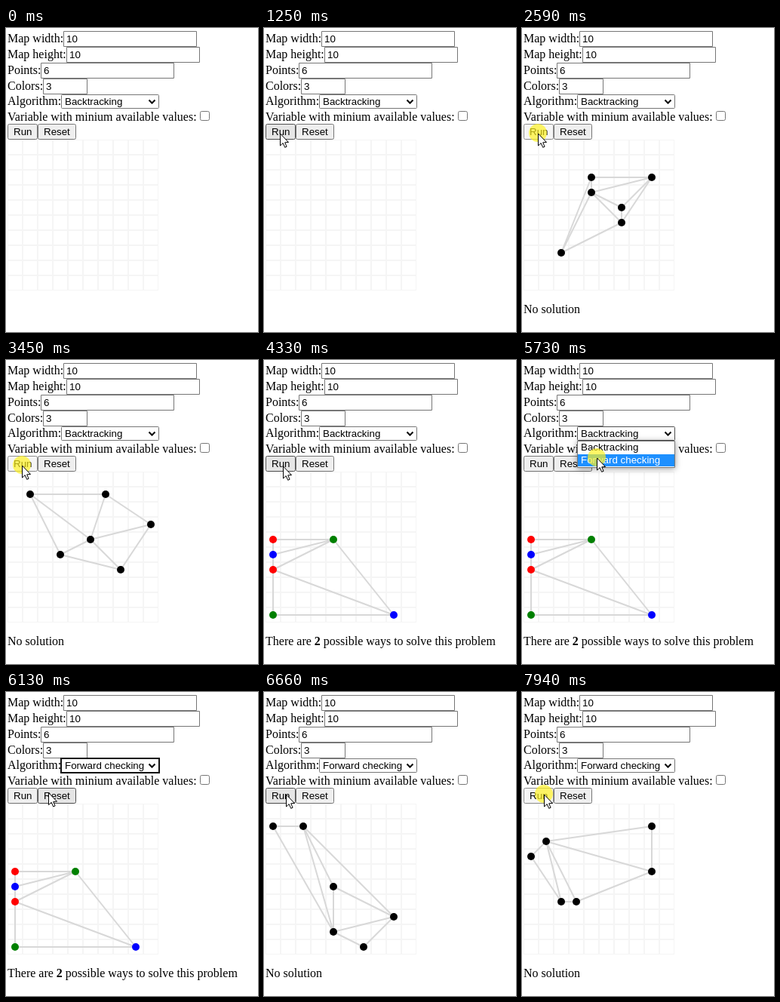
These frames come from a looping animation (334 by 403 pixels, 8 s). An HTML page with a canvas:

```html
<!DOCTYPE html>
<html lang="en">
<head>
<meta charset="utf-8">
<title>Map colouring</title>
<style>
html, body { margin: 0; width: 100%; height: 100%; overflow: hidden; background: #fff; }
canvas { display: block; }
</style>
</head>
<body>
<canvas id="stage" width="334" height="403"></canvas>
<script>
const ctx = document.getElementById('stage').getContext('2d');
const LOOP = 8000;
const HOLD = 130;                      // how long a click lasts
const APPEAR = 120, OPEN = 4860, PICK = 5730, RERUN = 6530;
const LEFT = 2, CELL = 20, GRID_TOP = 148;
const SERIF = '16px "Liberation Serif", serif';
const SANS = '13.333px "Liberation Sans", sans-serif';
const COLORS = ['red', 'green', 'blue'];
const EDGE = '#767676', HOT_EDGE = '#4f4f4f';

// Each run places six points, written as column and row digits.
const runs = [
  makeRun(1720, '43 42 82 64 65 27'),
  makeRun(2590, '54 11 61 93 76 35'),
  makeRun(3450, '06 44 05 04 09 89', true),
  makeRun(RERUN, '48 01 21 45 87 69'),
  makeRun(7330, '12 81 03 84 26 36')
];
const clicks = [...runs.map(r => r.at), OPEN, PICK, 7940];

// Cursor stops: start, end, x, y
const path = [
  [0, 0, 214, 324], [APPEAR, 920, 28, 138], [990, 1250, 22, 140],
  [4270, 4330, 26, 141], [4330, 4660, 103, 100],
  [OPEN + HOLD, 5660, 100, 130], [PICK + HOLD, 6330, 30, 136]
];

function side(a, b, c) {
  return Math.sign((b.x - a.x) * (c.y - a.y) - (b.y - a.y) * (c.x - a.x));
}

function crosses([a, b], [c, d]) {
  return side(a, b, c) * side(a, b, d) < 0 && side(c, d, a) * side(c, d, b) < 0;
}

function liesOn(p, a, b) {
  return side(a, b, p) === 0 && (p.x - a.x) * (p.x - b.x) + (p.y - a.y) * (p.y - b.y) < 0;
}

// Link each pair in turn unless the line meets another link or point.
function makeRun(at, cells, solved = false) {
  const points = cells.split(' ').map(([x, y]) => ({ x: +x, y: +y, color: '#000' }));
  const links = [];
  points.forEach((a, i) => points.slice(i + 1).forEach(b => {
    const blocked = links.some(l => crosses(l, [a, b])) || points.some(p => liesOn(p, a, b));
    if (!blocked) links.push([a, b]);
  }));
  if (solved) for (const p of points) {
    const used = links.filter(l => l.includes(p)).flat().map(q => q.color);
    p.color = COLORS.find(c => !used.includes(c));
  }
  return { at, points, links, solved };
}

const ease = k => k * k * (3 - 2 * k);

function cursorAt(t) {
  let x = 0, y = 0;
  for (const [a, b, tx, ty] of path) {
    if (t < a) break;
    const k = t >= b ? 1 : ease((t - a) / (b - a));
    x += (tx - x) * k;
    y += (ty - y) * k;
  }
  return { x, y };
}

// Draws a string and returns where it ends.
function text(str, x, y, font = SERIF, color = '#000') {
  ctx.font = font;
  ctx.fillStyle = color;
  ctx.fillText(str, x, y);
  return x + ctx.measureText(str).width;
}

function box(x, y, w, h, r, fill, edge) {
  ctx.beginPath();
  ctx.roundRect(x + .5, y + .5, w - 1, h - 1, r);
  ctx.fillStyle = fill;
  ctx.fill();
  ctx.strokeStyle = edge;
  ctx.lineWidth = 1;
  ctx.stroke();
}

function polyline(points, width, color) {
  ctx.beginPath();
  points.forEach(([x, y]) => ctx.lineTo(x, y));
  ctx.strokeStyle = color;
  ctx.lineWidth = width;
  ctx.stroke();
}

function disc(x, y, r, color) {
  ctx.beginPath();
  ctx.arc(x, y, r, 0, Math.PI * 2);
  ctx.fillStyle = color;
  ctx.fill();
}

function button(label, x, w, hot, down) {
  const [fill, edge] = !hot ? ['#efefef', EDGE] : down ? ['#f5f5f5', '#8d8d8d'] : ['#e5e5e5', HOT_EDGE];
  box(x, 127, w, 21, 2, fill, edge);
  text(label, x + 8, 142, SANS);
}

function drawSelect(t, hot) {
  const x = Math.round(text('Algorithm:', LEFT, 102));
  box(x, 88, 130, 19, 1, '#fff', hot ? HOT_EDGE : EDGE);
  const picked = t >= PICK + HOLD;
  if (picked && t < RERUN) {
    ctx.strokeStyle = '#101010';
    ctx.lineWidth = 2;
    ctx.strokeRect(x, 88, 130, 19);
  }
  text(picked ? 'Forward checking' : 'Backtracking', x + 5, 102, SANS);
  const tip = x + 120.5;
  polyline([[tip - 4, 95.5], [tip, 99.5], [tip + 4, 95.5]], 2, '#000');
}

function drawForm(t, over, down, open) {
  const fields = { 'Map width:': 10, 'Map height:': 10, 'Points:': 6, 'Colors:': 3 };
  Object.entries(fields).forEach(([label, value], row) => {
    const y = 4 + row * 21;
    const x = Math.round(text(label, LEFT, y + 15));
    box(x, y, label === 'Colors:' ? 59 : 177, 21, 0, '#fff', EDGE);
    text(value, x + 4, y + 15, SANS);
  });

  drawSelect(t, open || over(73, 88, 130, 19));

  const x = Math.round(text('Variable with minium available values:', LEFT, 123) + 4);
  box(x, 110, 13, 13, 2, '#fff', !open && over(LEFT, 108, 268, 19) ? HOT_EDGE : EDGE);

  button('Run', LEFT, 40, over(LEFT, 127, 40, 21), down);
  button('Reset', 42, 51, !open && over(42, 127, 51, 21), false);
}

function drawGraph(t) {
  ctx.strokeStyle = '#f5f5f5';
  ctx.lineWidth = 1;
  for (let x = 0; x < 10; x++)
    for (let y = 0; y < 10; y++)
      ctx.strokeRect(LEFT + .5 + x * CELL, GRID_TOP + .5 + y * CELL, CELL - 1, CELL - 1);

  const run = runs.filter(r => t >= r.at + HOLD).pop();
  if (!run) return;
  const place = p => [LEFT + (p.x + .5) * CELL, GRID_TOP + (p.y + .5) * CELL];
  run.links.forEach(link => polyline(link.map(place), 2, '#d8d8d8'));
  run.points.forEach(p => disc(...place(p), 5, p.color));

  if (run.solved) {
    let x = text('There are ', LEFT, 378);
    x = text('2', x, 378, 'bold ' + SERIF);
    text(' possible ways to solve this problem', x, 378);
  } else {
    text('No solution', LEFT, 378);
  }
}

function drawPopup(mouse) {
  ctx.save();
  ctx.shadowColor = 'rgba(0,0,0,.4)';
  ctx.shadowBlur = 8;
  ctx.shadowOffsetY = 1;
  ctx.fillStyle = '#fff';
  ctx.fillRect(73, 107, 130, 36);
  ctx.restore();
  box(73, 107, 130, 36, 0, '#fff', EDGE);

  ['Backtracking', 'Forward checking'].forEach((name, i) => {
    const y = 108 + i * 17;
    const picked = (mouse.y >= 125) === (i === 1);
    if (picked) {
      ctx.fillStyle = '#1e90ff';
      ctx.fillRect(74, y, 128, 16);
    }
    text(name, 78, y + 12, SANS, picked ? '#fff' : '#000');
  });
}

function drawCursor({ x, y }) {
  const shape = [[0, 0], [0, 16], [3.7, 12.6], [6.2, 18.3], [8.6, 17.3], [6.2, 11.8], [11, 11.5]];
  ctx.beginPath();
  shape.forEach(([dx, dy]) => ctx.lineTo(x + dx - .5, y + dy));
  ctx.closePath();
  ctx.fillStyle = '#fff';
  ctx.fill();
  ctx.strokeStyle = '#000';
  ctx.lineWidth = 1;
  ctx.stroke();
}

function draw(t) {
  const shown = t >= APPEAR;
  const mouse = cursorAt(t);
  const down = clicks.some(c => t >= c && t < c + HOLD);
  const open = t >= OPEN && t < PICK + HOLD;
  const over = (x, y, w, h) => shown &&
    mouse.x >= x && mouse.x < x + w && mouse.y >= y && mouse.y < y + h;

  ctx.fillStyle = '#fff';
  ctx.fillRect(0, 0, 334, 403);
  drawForm(t, over, down, open);
  drawGraph(t);
  if (open) drawPopup(mouse);
  if (down) disc(mouse.x - 1, mouse.y - 1, 12, 'rgba(255,242,30,.68)');
  if (shown) drawCursor(mouse);
}

const begin = performance.now();
function tick() {
  draw((performance.now() - begin) % LOOP);
  requestAnimationFrame(tick);
}
tick();
</script>
</body>
</html>
```
